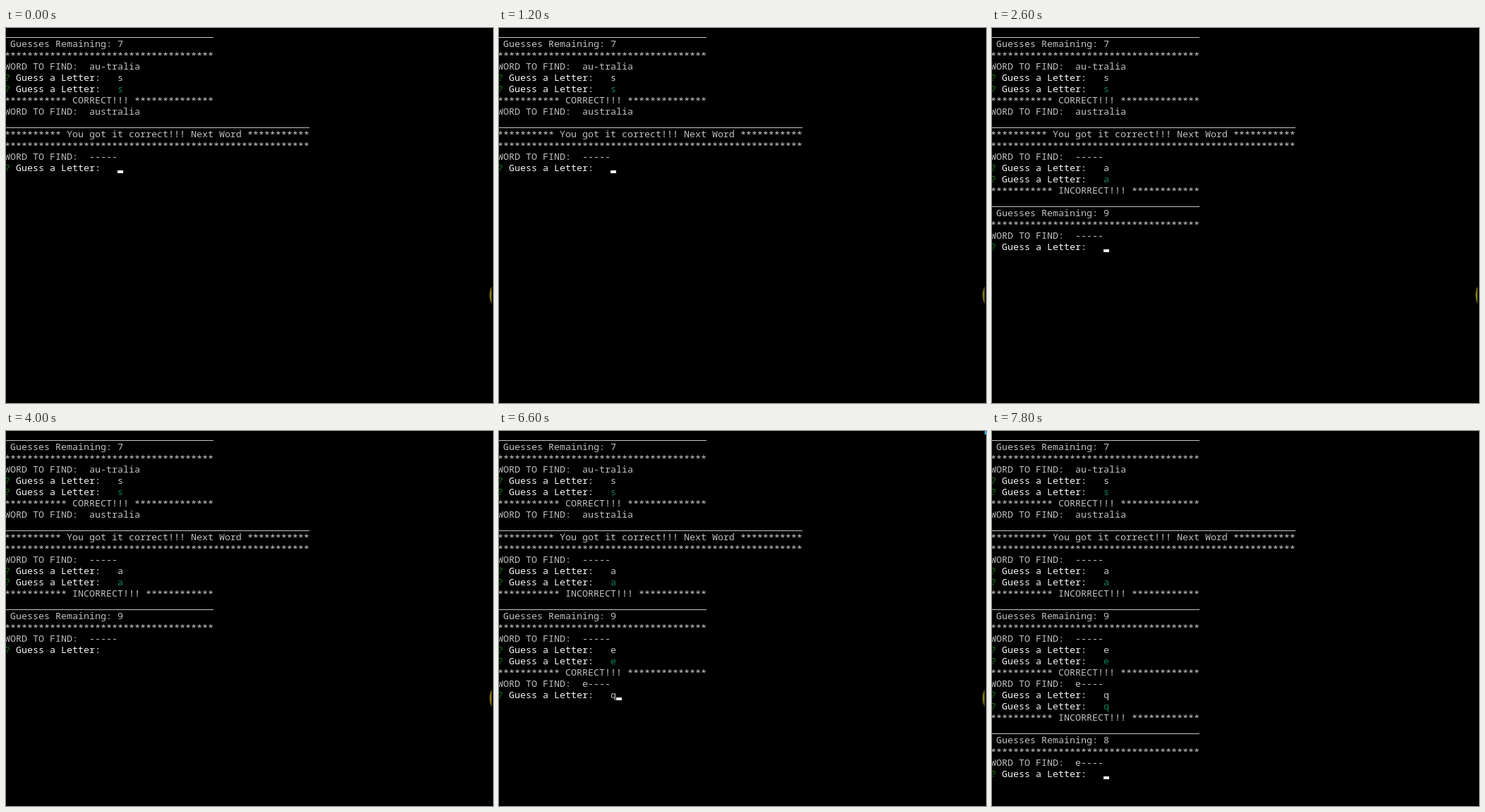
An HTML page that plays this animation: 690x532 px, repeating every 8 s.

```html
<!DOCTYPE html>
<html lang="en">
<head>
<meta charset="utf-8">
<title>Word guessing game in a terminal</title>
<style>
  html, body { margin: 0; width: 100%; height: 100%; overflow: hidden; background: #000; }
  #stage { position: relative; width: 690px; height: 532px; overflow: hidden; background: #000; }
  #stage div { position: absolute; }
  .line {
    left: -2px; height: 16px; white-space: pre; color: #c4c2c0;
    font: 13.333px/16px "Noto Sans Mono", "DejaVu Sans Mono", monospace;
    font-variant-ligatures: none;
  }
  .rule { left: 0; height: 1px; background: #c6c4c2; }
  .stars { position: relative; top: 1px; color: #d2cec6; }
  .mark { color: #147a14; }
  .prompt { color: #f6f4f2; }
  .typed { color: #ccc8c0; }
  .answer { color: #0e8460; }
  #cursor { width: 8px; height: 4px; background: #f8f6f4; }
  #halo { left: 685px; top: 353px; width: 52px; height: 52px; border-radius: 50%;
          background: #80780e; clip-path: inset(0 49px 0 0); }
  #glint { left: 688px; top: 0; width: 2px; height: 5px; background: #18b4e0; }
</style>
</head>
<body>
<div id="stage">
  <div id="halo"></div>
  <div id="glint"></div>
  <div id="cursor"></div>
</div>
<script>
const LOOP = 8000, CELL = 8, ROW = 16, LEFT = -2;
const stage = document.getElementById("stage");
const [halo, glint, cursor] = ["halo", "glint", "cursor"].map(id => document.getElementById(id));

const parts = [];   // elements with the time each one appears
let nextRow = 0;

function add(className, top, start, html = "") {
  const el = document.createElement("div");
  el.className = className;
  el.style.top = top + "px";
  el.innerHTML = html;
  stage.insertBefore(el, cursor);
  parts.push({ el, start });
  return el;
}

const span = (name, text) => `<span class="${name}">${text}</span>`;
const stars = n => span("stars", "*".repeat(n));
const text = (start, html) => add("line", ROW * nextRow++ - 2, start, html);
const banner = (start, before, label, after) =>
  text(start, `${stars(before)} ${label} ${stars(after)}`);
const word = (start, letters) => text(start, "WORD TO FIND:  " + letters);

function rule(start, columns) {
  add("rule", ROW * nextRow++ + 13, start).style.width = LEFT + columns * CELL + "px";
}

function guess(start, letter, typedAt, kind) {
  const el = text(start, span("mark", "?") + " " + span("prompt", "Guess a Letter:") + "   ");
  if (letter) {
    const key = document.createElement("span");
    key.className = kind;
    key.textContent = letter;
    el.append(key);
    parts.push({ el: key, start: typedAt });
  }
}

function enter(start, letter, correct) {
  guess(start, letter, start, "answer");
  if (correct) banner(start, 11, "CORRECT!!!", 14);
  else banner(start, 11, "INCORRECT!!!", 12);
}

function remaining(start, count) {
  rule(start, 37);
  text(start, " Guesses Remaining: " + count);
  text(start, stars(37));
}

remaining(0, 7);
word(0, "au-tralia");
guess(0, "s", 0, "typed");
enter(0, "s", true);
word(0, "australia");
rule(0, 54);
banner(0, 10, "You got it correct!!! Next Word", 11);
text(0, stars(54));
word(0, "-----");
guess(0, "a", 2000, "typed");

enter(2600, "a", false);
remaining(2600, 9);
word(2600, "-----");
guess(2600, "e", 5200, "typed");

enter(6000, "e", true);
word(6000, "e----");
guess(6000, "q", 6600, "typed");

enter(7200, "q", false);
remaining(7200, 8);
word(7200, "e----");
guess(7200);

// Cursor states: start time, then row and column, or nothing while it is off.
const blinks = [
  [0, 12, 20], [400], [1000, 12, 20], [1600], [2000, 12, 21],
  [2600, 19, 20], [3000], [3600, 19, 20], [4000], [4400, 19, 20],
  [5200, 19, 21], [5600], [6000, 23, 20], [6600, 23, 21],
  [7200, 30, 20], [7400], [7800, 30, 20]
];

const show = (el, on) => { el.style.visibility = on ? "visible" : "hidden"; };

function draw(now) {
  const t = now % LOOP;
  for (const { el, start } of parts) show(el, t >= start);

  const [, row, column] = blinks.findLast(blink => t >= blink[0]);
  show(cursor, row !== undefined);
  if (row !== undefined) {
    cursor.style.left = LEFT + column * CELL + "px";
    cursor.style.top = ROW * row + 10 + "px";
  }

  show(halo, t < 7000);
  show(glint, t >= 6600 && t < 6800);
}

const began = performance.now();
function tick() {
  draw(performance.now() - began);
  requestAnimationFrame(tick);
}
tick();
</script>
</body>
</html>
```
